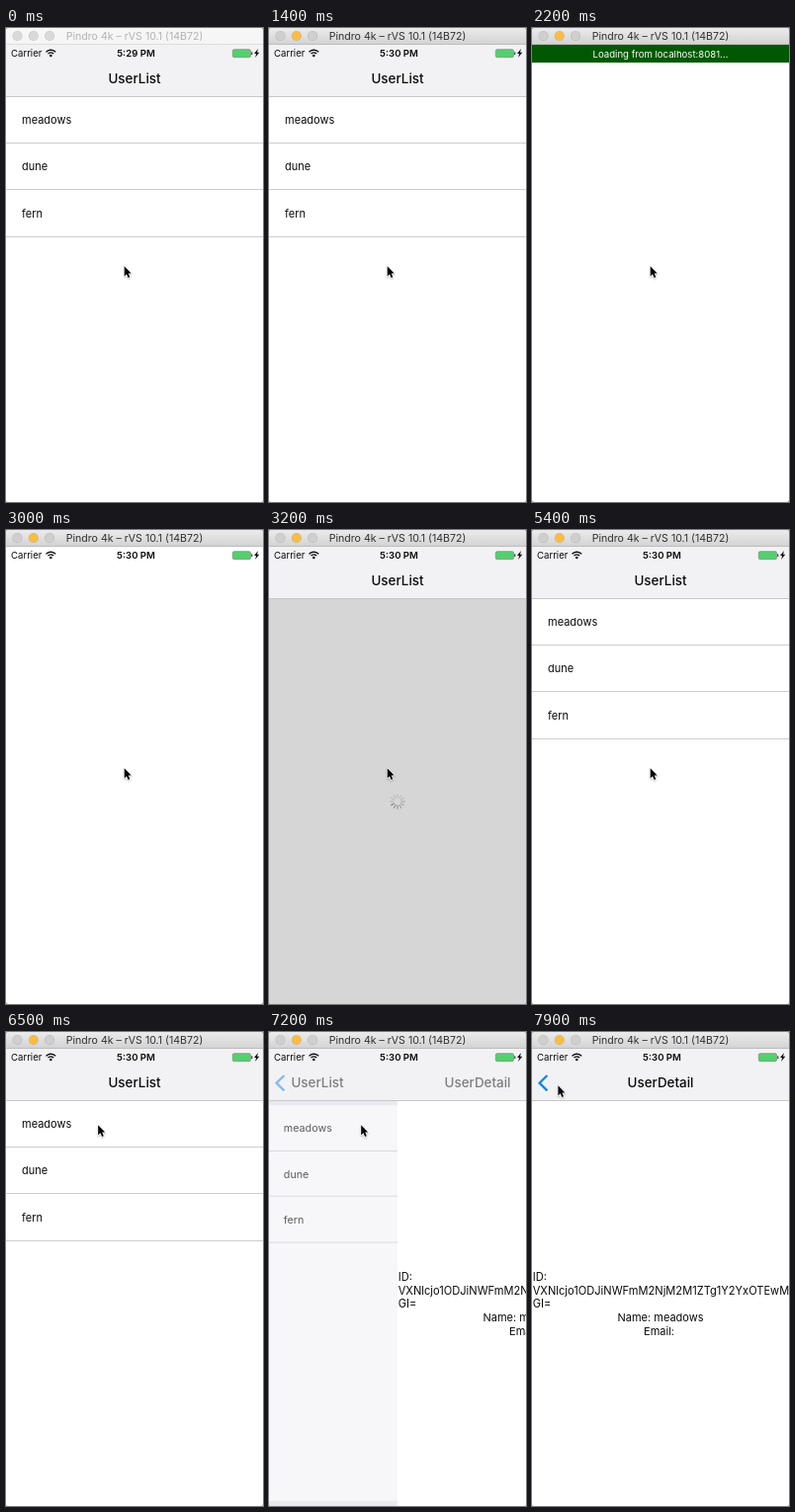
An HTML page with a canvas for the animation above (8 s loop, 260x480 px).

```html
<!DOCTYPE html>
<html lang="en">
<head>
<meta charset="utf-8">
<title>User list</title>
<style>
html, body { margin: 0; width: 100%; height: 100%; overflow: hidden; background: #8c8c8c; }
canvas { display: block; }
</style>
</head>
<body>
<canvas id="stage" width="260" height="480"></canvas>
<script>
const g = document.getElementById('stage').getContext('2d');
const W = 260, H = 480, LOOP = 8000, STEP = 100;
const USERS = ['meadows', 'dune', 'fern'];
const HEAD = '#f2f2f5', INK = '#0a0a0a';

const clamp = v => Math.max(0, Math.min(1, v));
const span = (t, a, b) => clamp((t - a) / (b - a));
const ease = p => p * p * (3 - 2 * p);
const mix = (a, b, p) => a + (b - a) * p;

function rect(x, y, w, h, color) {
  g.fillStyle = color;
  g.fillRect(x, y, w, h);
}

function text(s, x, y, size, color = INK, align = 'left', weight = 400) {
  g.font = `${weight} ${size}px Inter, "Open Sans", sans-serif`;
  g.textAlign = align;
  g.fillStyle = color;
  g.fillText(s, x, y);
}

function disc(x, y, r, color) {
  g.fillStyle = color;
  g.beginPath();
  g.arc(x, y, r, 0, 7);
  g.fill();
}

function stroke(path, color, width) {
  g.strokeStyle = color;
  g.lineWidth = width;
  g.stroke(path);
}

function layer(alpha, dx, draw) {
  g.save();
  g.globalAlpha = alpha;
  g.translate(dx, 0);
  draw();
  g.restore();
}

function titleBar(active) {
  const fill = g.createLinearGradient(0, 0, 0, 17);
  fill.addColorStop(0, active ? '#ebebeb' : '#f7f7f7');
  fill.addColorStop(1, active ? '#d2d2d2' : '#f5f5f5');
  rect(0, 0, W, 17, fill);
  rect(0, 16, W, 1, active ? '#bdbdbd' : '#dddddd');
  const gray = active ? '#cfcfcf' : '#d9d9d9';
  [gray, active ? '#fdbc40' : gray, gray].forEach((color, i) => {
    const x = 11.5 + 16.3 * i;
    disc(x, 8, 5, 'rgba(0,0,0,.2)');
    disc(x, 8, 4.6, color);
  });
  text('Pindro 4k – rVS 10.1 (14B72)', 130, 12.3, 10.6, active ? '#303030' : '#b2b2b2', 'center');
}

const bolt = new Path2D('M255 21L251 26H253.3L252 30L256.3 24.8H254Z');

function statusBar(clock) {
  text('Carrier', 5, 29, 9.6);
  text(clock, 131.5, 29, 9.6, INK, 'center', 600);
  // Wi-Fi
  g.strokeStyle = INK;
  g.lineWidth = 1.4;
  for (const r of [3.7, 6.4]) {
    g.beginPath();
    g.arc(45.3, 28.6, r, -Math.PI * .77, -Math.PI * .23);
    g.stroke();
  }
  disc(45.3, 28, 1.3, INK);
  // Battery
  g.beginPath();
  g.roundRect(229.3, 21.7, 18.2, 8, 1.5);
  g.fillStyle = '#53d06d';
  g.fill();
  g.strokeStyle = '#7d8c81';
  g.lineWidth = .7;
  g.stroke();
  rect(248.2, 24.3, 1.1, 2.8, '#333');
  g.fillStyle = INK;
  g.fill(bolt);
}

function list() {
  rect(0, 69, W, 411, '#fff');
  USERS.forEach((name, i) => {
    text(name, 16, 97 + 47.3 * i, 11);
    rect(0, Math.round(116 + 47.3 * i), W, 1, '#cdcdcf');
  });
}

function detail() {
  rect(0, 69, W, 411, '#fff');
  ['ID:', 'VXNlcjo1ODJiNWFmM2NjM2M1ZTg1Y2YxOTEwM', 'GI=']
    .forEach((s, i) => text(s, .7, 252 + 13.6 * i, 11.1));
  text('Name: ' + USERS[0], 130, 293, 11, INK, 'center');
  text('Email:', 128.5, 307, 11, INK, 'center');
}

function loading(t) {
  rect(0, 69, W, 411, '#d6d6d6');
  const head = 8 + Math.floor((t - 3200) * 12 / 1000);
  for (let i = 0; i < 12; i++) {
    const age = ((head - i) % 12 + 12) % 12;
    const shade = Math.min(190, 138 + age * 8);
    const a = i * Math.PI / 6, x = Math.sin(a), y = -Math.cos(a);
    g.strokeStyle = `rgb(${shade},${shade},${shade})`;
    g.lineWidth = 1.3;
    g.lineCap = 'round';
    g.beginPath();
    g.moveTo(130 + 4 * x, 275 + 4 * y);
    g.lineTo(130 + 7.2 * x, 275 + 7.2 * y);
    g.stroke();
  }
  g.lineCap = 'butt';
}

const chevron = new Path2D('M15.4 44L7.6 51.7L15.4 59.4');

// push: 0 shows the list, 1 shows the detail page
function header(push) {
  rect(0, 17, W, 52, HEAD);
  rect(0, 69, W, 1, '#c8c8cb');
  const title = s => text(s, 130, 56.3, 13.4, INK, 'center', 500);
  layer(1 - push, -162 * push, () => title('UserList'));
  layer(push, 162 * (1 - push), () => title('UserDetail'));
  layer(push, 0, () => stroke(chevron, '#1a86ea', 2.4));
}

function pages(push) {
  if (push > 0) rect(0, 69, W, 411, '#e9e9ef');
  g.save();
  g.globalAlpha = 1 - .7 * push;
  const scale = 1 - .05 * push;
  g.translate(130 - 8 * push, 274);
  g.scale(scale, scale);
  g.translate(-130, -274);
  list();
  g.restore();
  if (push > 0) layer(1, W * (1 - push), detail);
}

function banner() {
  rect(0, 17, W, 18, '#005900');
  text('Loading from localhost:8081...', 130, 29.5, 9.6, '#fff', 'center');
}

const arrow = new Path2D('M0 0V11L2.6 8.6L4.5 12.8L6.4 12L4.6 7.9H8Z');

function cursor(t) {
  const up = ease(span(t, 5900, 6500)), back = span(t, 7300, 7900);
  g.save();
  g.translate(mix(mix(119.7, 93.2, up), 26.4, back), mix(mix(241.3, 94.3, up), 54.3, back));
  g.scale(.88, .92);
  g.lineJoin = 'round';
  g.shadowColor = 'rgba(0,0,0,.25)';
  g.shadowBlur = 2;
  g.shadowOffsetY = 1;
  stroke(arrow, '#fff', 1.6);
  g.shadowColor = 'transparent';
  g.fillStyle = '#000';
  g.fill(arrow);
  g.restore();
}

function draw(t) {
  const push = ease(span(t, 6900, 7500));
  const reloading = t >= 2000 && t < 3000;
  const blank = t >= 2100 && t < 3200;
  g.clearRect(0, 0, W, H);
  g.save();
  g.beginPath();
  g.roundRect(0, 0, W, H, 2.5);
  g.clip();
  rect(0, 0, W, H, '#fff');
  if (!blank) {
    if (t >= 3200 && t < 5400) loading(t);
    else pages(push);
    header(push);
  }
  statusBar(t < 1200 ? '5:29 PM' : '5:30 PM');
  if (reloading) banner();
  titleBar(t >= 1400);
  cursor(t);
  g.restore();
}

const start = performance.now();
function tick() {
  const t = (performance.now() - start) % LOOP;
  draw(Math.floor(t / STEP) * STEP);
  requestAnimationFrame(tick);
}
tick();
</script>
</body>
</html>
```
